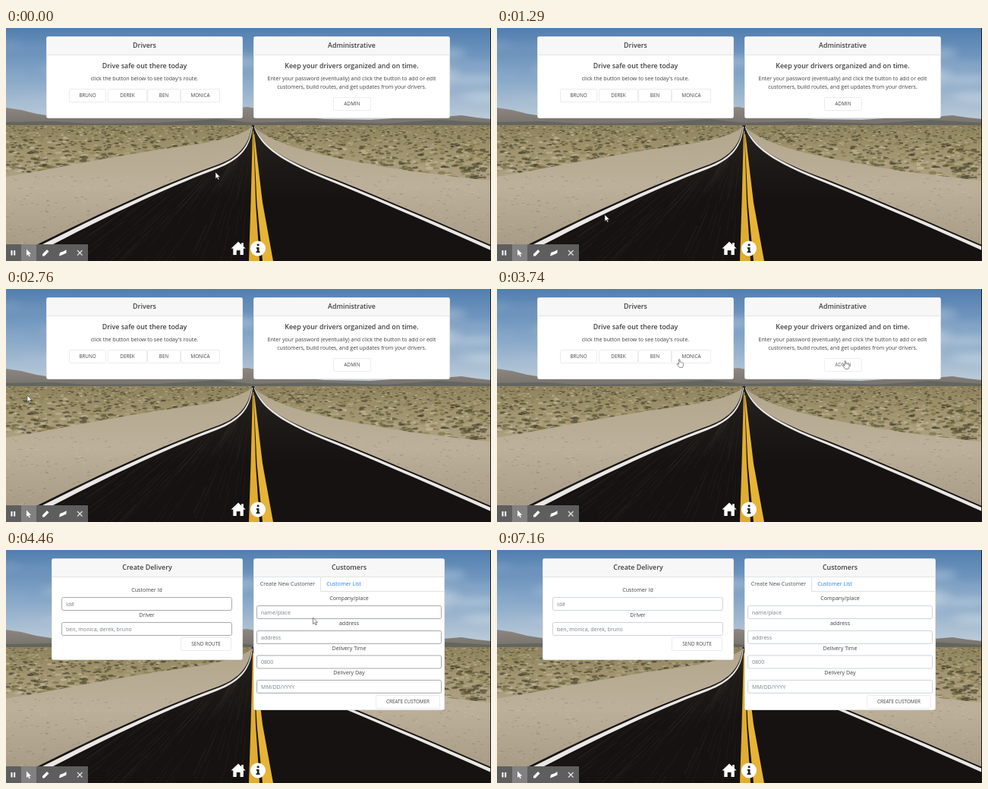
Write an HTML page with a canvas that moves like this. It is 639 by 307 pixels and loops after 8 s.

```html
<!DOCTYPE html>
<html lang="en">
<head>
<meta charset="utf-8">
<title>Delivery routes</title>
<style>
html, body { margin: 0; width: 100%; height: 100%; overflow: hidden; }
canvas, svg { position: absolute; left: 0; top: 0; width: 639px; height: 307px; }
text { font-family: "Open Sans", "Noto Sans", sans-serif; }
</style>
</head>
<body>
<canvas id="photo" width="639" height="307"></canvas>
<svg id="ui" viewBox="0 0 639 307"></svg>
<script>
const W = 639, H = 307;

// Landscape
const ctx = document.getElementById('photo').getContext('2d');
let seed = 11;
const rand = () => (seed = (seed * 16807) % 2147483647) / 2147483647;

function gradient(y0, y1, ...colors) {
  const g = ctx.createLinearGradient(0, y0, 0, y1);
  colors.forEach((c, i) => g.addColorStop(i / (colors.length - 1), c));
  return g;
}
function shape(path, fill) {
  ctx.fillStyle = fill;
  ctx.fill(new Path2D(path));
}
function blob(x, y, rx, ry, fill) {
  ctx.fillStyle = fill;
  ctx.beginPath();
  ctx.ellipse(x, y, rx, ry, 0, 0, 7);
  ctx.fill();
}

function drawSky() {
  ctx.fillStyle = gradient(0, 128, '#527fb0', '#85a6c8', '#c3d0da');
  ctx.fillRect(0, 0, W, 130);
  ctx.filter = 'blur(6px)';
  for (let i = 0; i < 34; i++) {
    const x = rand() * W, y = 20 + rand() * 90;
    blob(x, y, 18 + rand() * 40, 2 + rand() * 5, `rgba(226,232,237,${0.12 + 0.25 * x / W})`);
  }
  ctx.filter = 'none';
  shape('M0 129V105L20 108 40 113 60 116 130 119 215 119 262 112 292 106 318 104 345 109 375 116 420 120 480 121 540 117 575 117 600 115 620 118 639 120V129Z',
    gradient(104, 129, '#8f8780', '#74706b'));
  shape('M0 129V124L60 123 110 126 200 125 280 120 325 125 400 123 500 126 570 121 639 125V129Z', '#65655f');
}

function drawDesert() {
  ctx.fillStyle = gradient(128, 200, '#8f845f', '#a1946f', '#b0a285');
  ctx.fillRect(0, 128, W, H - 128);
  const greens = ['#4a4730', '#5f5a38', '#777044', '#8d8350', '#b3a682', '#cabda0', '#403d2b'];
  ctx.filter = 'blur(.6px)';
  ctx.globalAlpha = 0.65;
  for (let i = 0; i < 2600; i++) {
    const depth = (i / 2600) ** 1.3, x = rand() * W;
    const y = 129 + depth * (x > 325 ? 72 : 62);
    const r = 0.6 + depth * 2 * rand();
    blob(x, y, r * 2.6, r, greens[Math.floor(rand() * greens.length)]);
  }
  ctx.globalAlpha = 1;
  ctx.filter = 'none';
  const sand = gradient(130, 290, '#b2a68c', '#bcb09a', '#a89b86');
  shape('M325 129C310 144 270 151 210 159C130 171 60 186 0 196V307H325Z', sand);
  shape('M325 129C350 152 400 164 450 174C510 186 560 193 639 201V307H325Z', sand);
  for (let i = 0; i < 900; i++)
    blob(rand() * W, 195 + rand() * 95, 0.5 + rand() * 2.2, 0.5, rand() < 0.5 ? 'rgba(100,84,66,.28)' : 'rgba(215,206,190,.3)');
}

function drawRoad() {
  const road = 'M324 128C320 156 306 171 275 181.5C204 207 114 248 10 301V307H639V286C575 258 505 228 436 200C365 174 338 157 327 128Z';
  shape(road, gradient(128, 230, '#2b2623', '#1d1917', '#151211'));
  ctx.save();
  ctx.clip(new Path2D(road));
  // Worn lanes run towards the vanishing point
  for (let i = 0; i < 160; i++) {
    const x = rand() * 320 - 10, from = rand(), to = from + 0.2;
    const at = k => [325 + (x - 325) * k, 128 + 179 * k];
    ctx.strokeStyle = 'rgba(76,62,53,.22)';
    ctx.beginPath();
    ctx.moveTo(...at(from));
    ctx.lineTo(...at(to));
    ctx.stroke();
  }
  ctx.restore();
  shape('M324 130C320.5 157 307 172 276 183C205 209 115 250 15 302L24 305C122 253 207 212 278 185.5C310 173 322 157 325 130Z', '#e9e7e3');
  shape('M327.5 130C339 157 366 175 436 202C505 230 575 260 639 288V293C574 264 503 233 434 204.5C362 176 336 158 326.7 130Z', '#e9e7e3');
  shape('M325 136L322.5 230 320 307H334L329 230 326 136Z', '#e0ac31');
  shape('M326.3 140L330.5 230 338 307H352L338 230 327.3 140Z', '#e6b436');
}

drawSky();
drawDesert();
drawRoad();
ctx.fillStyle = '#1b1b1b';
ctx.fillRect(W - 1, 0, 1, H);

// Interface
const text = (x, y, s, size = 7.1, { fill = '#404040', weight = 400, anchor = 'middle' } = {}) =>
  `<text x="${x}" y="${y + size * 0.35}" font-size="${size}" font-weight="${weight}" fill="${fill}" text-anchor="${anchor}">${s}</text>`;
const bold = (x, y, s) => text(x, y, s, 8.9, { weight: 600 });
const box = (x, y, w, h, fill, stroke = 'none', r = 0, extra = '') =>
  `<rect x="${x}" y="${y}" width="${w}" height="${h}" rx="${r}" fill="${fill}" stroke="${stroke}" ${extra}/>`;
const path = (d, fill, extra = '') => `<path d="${d}" fill="${fill}" ${extra}/>`;

const card = (x, w, h, title) =>
  box(x + .5, 11.5, w - 1, h - 1, '#fff', '#e3e5e6', 2) +
  box(x + 1, 12, w - 2, 23, '#f7f7f7') + box(x + 1, 35, w - 2, 1, '#e4e4e4') +
  bold(x + w / 2, 23, title);
const button = (x, y, w, label, extra = '') =>
  box(x + .5, y + .5, w - 1, 17, '#fff', '#ececec', 1, extra) + text(x + w / 2, y + 9, label, 6.3);
const field = (x, y, w, label, hint) =>
  text(x + w / 2, y - 9, label) +
  box(x + .5, y + .5, w - 1, 17, '#fff', '#a6a9ac', 2, 'class="field"') +
  text(x + 6, y + 9.5, hint, 7.1, { fill: '#7b8187', anchor: 'start' });

const home =
  card(53, 259, 108, 'Drivers') +
  bold(182.5, 50, 'Drive safe out there today') +
  text(182.5, 67, 'click the button below to see today\'s route.') +
  button(83, 80, 49, 'BRUNO') + button(134, 80, 52, 'DEREK') +
  button(186, 80, 44, 'BEN') + button(230, 80, 52, 'MONICA') +
  card(326, 259, 108, 'Administrative') +
  bold(455.5, 50, 'Keep your drivers organized and on time.') +
  text(455.5, 66.5, 'Enter your password (eventually) and click the button to add or edit') +
  text(455.5, 77.5, 'customers, build routes, and get updates from your drivers.') +
  `<g id="admin">${button(431, 91, 50, 'ADMIN', 'id="adminBox"')}</g>`;

const forms =
  card(60, 252, 134, 'Create Delivery') +
  field(73, 62, 225, 'Customer Id', 'Id#') +
  field(73, 95, 225, 'Driver', 'ben, monica, derek, bruno') +
  button(230, 115, 67, 'SEND ROUTE') +
  card(326, 252, 200, 'Customers') +
  path('M327 35.5H414.5V54.5H577', 'none', 'stroke="#dee2e6"') +
  text(371, 44.5, 'Create New Customer', 7.1, { fill: '#495057' }) +
  text(445, 44.5, 'Customer List', 7.1, { fill: '#1a85f5' }) +
  field(330, 73, 244, 'Company/place', 'name/place') +
  field(330, 106, 244, 'address', 'address') +
  field(330, 138.5, 244, 'Delivery Time', '0800') +
  field(330, 171, 244, 'Delivery Day', 'MM/DD/YYYY') +
  button(487, 191, 85, 'CREATE CUSTOMER');

const footer =
  path('M306 281.5L296.5 290.5H299.3V299H303.7V293H308.5V299H312.8V290.5H315.7L312.8 287.8V283H310.2V285.4Z', '#fff') +
  '<circle cx="332" cy="290.5" r="10" fill="#fff"/>' +
  path('M330.7 284.5h2.8v2.6h-2.8zM329.8 288.9h3.7v5.4h1v1.8h-5v-1.8h1.2v-3.6h-.9z', '#222');

const pointer = 'M0 0V8.6L2 6.8 3.4 9.8 4.8 9.2 3.4 6.3H6.1Z';
const toolbar =
  box(0, 285, 108, 22, '#5e5e5e') + box(20, 285, 20, 22, '#818181') +
  path('M6.5 293h2v6.5h-2zM10.2 293h2v6.5h-2z', '#fff') +
  path(pointer, '#fff', 'transform="translate(27 291.5)"') +
  path('M48 300.5V298L54 292 56.5 294.5 50.5 300.5Z', '#fff') +
  path('M70 300.5L71 296 76.5 294 79.5 292V296.5L74 299Z', '#fff') +
  path('M94 293L100.5 299.5M100.5 293L94 299.5', 'none', 'stroke="#e8e8e8" stroke-width="1.1"');

const handPath = 'M2.2.7Q3.4.2 3.5 1.6V4.3Q4.6 3.8 5 4.7Q6.1 4.2 6.5 5.2Q8.1 4.8 8 6.4V8.5L7 11.3H2.7L0 7.5Q-.6 6.1.6 6.2L2 7.3Z';
const hand = path(handPath, '#fff', 'stroke="#666" stroke-width=".75"');
const arrow = path(pointer, '#fff', 'stroke="#333" stroke-width=".6"');

document.getElementById('ui').innerHTML =
  `<g id="home">${home}</g><g id="forms">${forms}</g>${footer}${toolbar}
  <g id="rest" transform="translate(237.5 92)">${hand}</g>
  <g id="arrow">${arrow}</g><g id="hand">${hand}</g>`;

// The pointer jumps: [time, x, y, kind]
const moves = [
  [0, 276, 190, 'arrow'], [100, 262, 203, 'arrow'], [240, 225, 225, 'arrow'], [540, 160, 246, 'arrow'],
  [680, 131, 251, 'arrow'], [1150, 142, 246, 'arrow'], [1300, 195, 222, 'arrow'], [1450, 285, 180, 'arrow'],
  [1640, 375, 138, 'arrow'], [1790, 432, 113, 'hand'], [1940, 449, 103, 'hand'],
  // sweep clockwise round the whole page
  [2210, 588, 150, 'arrow'], [2380, 450, 268, 'arrow'], [2550, 180, 250, 'arrow'], [2720, 28, 140, 'arrow'],
  [2890, 90, 14, 'arrow'], [3050, 210, 29, 'arrow'],
  [3350, 237.5, 92, 'hand'], [3740, 456, 94, 'hand'], [4150, 445, 95, 'hand'], [4290, 421, 92, 'hand'],
  [4460, 404.5, 89, 'arrow'], [6660, 381, 22, 'arrow'], [7020, 184, 61, 'arrow'], [7160, 0, 0, 'none']
];
const $ = id => document.getElementById(id);
const fields = document.querySelectorAll('.field');
const show = (id, on) => $(id).style.display = on ? '' : 'none';

function render(t) {
  const [, x, y, kind] = moves.findLast(m => m[0] <= t);
  for (const id of ['arrow', 'hand']) {
    show(id, kind === id);
    $(id).setAttribute('transform', `translate(${x} ${y})`);
  }
  show('home', t < 4460);
  show('forms', t >= 4460);
  show('rest', t >= 3740 && t < 4460);
  const hovered = kind === 'hand' && x > 431;
  $('admin').setAttribute('opacity', hovered ? 0.8 : 1);
  $('adminBox').setAttribute('stroke', t >= 4150 ? '#a8a8a8' : '#ececec');
  fields.forEach(f => f.setAttribute('stroke', t < 6040 ? '#a6a9ac' : '#ced4da'));
}
function tick() {
  render(performance.now() % 8000);
  requestAnimationFrame(tick);
}
tick();
</script>
</body>
</html>
```
